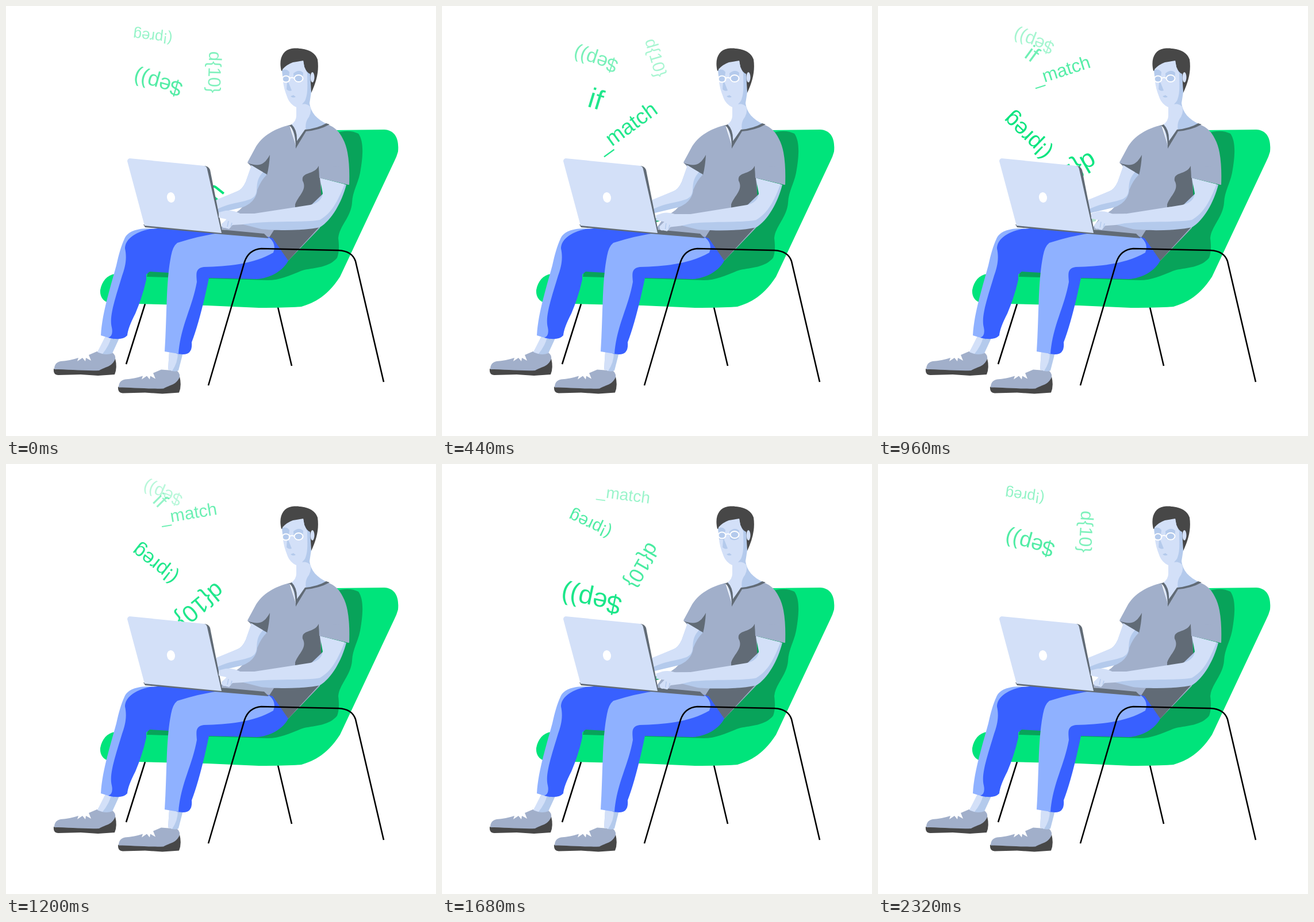
These frames come from a looping animation (748x748 px, 2.36 s). An HTML page:

```html
<!DOCTYPE html>
<html lang="en">
<head>
<meta charset="utf-8">
<title>Coding in a chair</title>
<style>
html, body { margin: 0; height: 100%; overflow: hidden; background: #fff; }
svg { display: block; width: 100vw; height: 100vh; }
text { font-family: "Liberation Sans", Arial, sans-serif; text-anchor: middle; fill: #00e47b; }
.green { fill: #00e47b; }
.shade { fill: #08a35a; }
.skin { fill: #d3e0f8; }
.skin2 { fill: #b4caec; }
.cloth { fill: #a1afca; }
.cloth2 { fill: #616b76; }
.pants { fill: #8fb1ff; }
.pants2 { fill: #3860ff; }
.dark { fill: #474747; }
.frame { fill: none; stroke: #000; stroke-width: 2.6; }
</style>
</head>
<body>
<svg viewBox="0 0 748 748">
  <path class="frame" d="M242 518L209 623M473 524L497 626"/>
  <path class="green" d="M570 216L658 215C677 216 684 231 682 253Q680 261 676 269L581 471C560 503 540 515 514 523Q490 525 440 525L350 521L185 517C169 516 163 506 164 494C167 478 176 468 190 466L300 458L500 400Z"/>
  <path class="shade" d="M570 222C590 216 602 217 613 222C623 236 621 262 616 290C612 310 603 322 602 342C600 368 580 382 578 404C580 420 579 430 576 438C562 455 538 455 519 459C500 465 480 477 455 477L350 474L245 471L247 462L300 455L480 400Z"/>

  <g id="words"></g>

  <!-- head and neck -->
  <path class="dark" d="M479 113C474 92 481 77 497 74C517 72 537 77 542 93C545 113 540 132 531 151L524 150L516 98Z"/>
  <path class="skin2" d="M517 95L519 106Q523 116 529 118L531 150L528 169C530 185 540 197 560 206L522 217L510 200L514 120Z"/>
  <path class="skin" d="M481 110Q488 102 499 98L517 95L519 106L524 117C524 136 526 152 520 165L515 171Q523 169 529 175Q532 184 527 193C520 202 521 211 522 218L505 247L495 207Q506 201 505 188V176C498 173 492 167 489 158Q483 143 482 131Z"/>
  <ellipse class="skin" cx="533" cy="124" rx="3.5" ry="9"/>
  <path class="skin2" d="M480 112Q488 108 493 115L491 132L497 147Q492 149 488 145L489 132L482 131ZM500 117Q510 109 517 116L516 130Q508 135 501 130ZM495 157L500 155L504 158Q499 161 495 157Z"/>
  <g id="glasses" fill="none" stroke="#fff" stroke-width="2">
    <ellipse cx="487" cy="127" rx="6.5" ry="5.5"/>
    <ellipse cx="509" cy="126" rx="7.5" ry="6"/>
    <path d="M493 126Q497 123 502 126"/>
  </g>

  <!-- shirt -->
  <path class="cloth" d="M493 207C469 213 445 225 433 248L420 272L440 296L426 335L406 355L384 371L372 388L460 404L491 443L546 386L548 299L597 311C598 285 597 250 586 231Q577 212 559 206L522 217L505 246Z"/>
  <path class="cloth2" d="M459 259C449 277 440 280 420 273L454 294Q458 278 459 259ZM544 278C537 294 513 288 516 304C525 320 507 331 503 345V352L550 348L546 299ZM547 382L491 443L457 404L466 390Z"/>
  <path class="cloth2" d="M489 209L497 206Q507 216 506 235L520 215Q542 213 557 204L563 206Q545 216 522 218L504 248Q504 217 493 208Z"/>

  <!-- far arm -->
  <path class="skin2" d="M427 278L454 293Q443 304 437 320C436 335 424 347 408 351L366 361V338L403 322Q411 319 417 306Z"/>
  <path class="skin" d="M427 277L447 289C431 306 440 321 433 330C425 342 395 339 366 354V337L403 322Q411 319 417 306Z"/>

  <!-- trousers, ankles, shoes -->
  <g id="shoe">
    <path class="dark" d="M83 631Q82 642 91 642L130 641L160 643L189 641Q194 629 190 613L150 626Z"/>
    <path class="cloth" d="M84 632Q84 620 95 618Q111 617 126 612L124 618L133 612L138 618L139 612L148 617L144 607L158 601L185 603Q191 607 190 614C184 628 174 627 162 634C140 635 105 632 84 632Z"/>
  </g>
  <use href="#shoe" x="112" y="31.5"/>
  <path class="skin2" d="M175 574L159 602Q173 609 185 604L197 578Z"/>
  <path class="skin" d="M173 574L159 602L168 605Q180 590 183 576Z"/>
  <path class="skin2" d="M284 601L282 632Q293 638 300 634L308 603Z"/>
  <path class="skin" d="M284 601L282 632L289 635Q299 620 299 603Z"/>
  <path class="pants" d="M245 387C222 388 211 394 206 405C200 418 196 433 192 451C180 495 167 535 165 573L188 580L230 460L300 390Z"/>
  <path class="pants2" d="M250 388C222 394 207 407 207 422C211 440 207 455 202 469C190 509 179 540 184 559Q187 574 178 577Q202 583 211 573Q212 560 225 535Q238 504 244 476V467L250 462L300 465L400 400L370 390L300 384Z"/>
  <path class="pants2" d="M450 400L464 404L491 443C482 461 458 474 436 475L353 473C346 508 334 557 323 585Q325 606 308 606L297 605L330 450Z"/>
  <path class="pants" d="M298 412Q335 400 376 394L458 403Q471 414 465 429C431 449 385 453 344 454C329 456 331 466 332 480C324 525 304 555 300 605L276 601C280 540 278 480 287 435Q290 418 298 412Z"/>

  <!-- laptop -->
  <path id="gap" class="shade" d="M370 370L380 367L379 374L373 376Z"/>
  <path class="cloth2" d="M239 380L375 389L449 396L457 404L374 397L242 385ZM344 278Q352 278 355 285L377 396L371 396Z"/>
  <path class="skin" d="M215 265L345 278Q349 279 350 284L375 395L241 382L211 270Q211 266 215 265Z"/>
  <ellipse cx="287" cy="333" rx="7" ry="9" fill="#fff" transform="rotate(-10 287 333)"/>

  <!-- near arm -->
  <g id="arm">
    <path class="skin2" d="M548 300L592 311C584 342 566 373 546 385C518 391 470 391 444 388L405 378L430 364L529 348L552 326Z"/>
    <path class="skin" d="M546 299L589 310C577 339 568 359 546 372C520 377 470 373 425 378L405 380L402 361L432 361L529 346Q549 342 551 326Z"/>
  </g>
  <g id="hand">
    <path class="skin" d="M430 361L411 363Q396 354 382 356L370 359V368L384 371L375 379Q375 387 381 386L388 388L394 381L412 380L430 377Z"/>
    <path d="M387 374L385 384M393 377L391 384" fill="none" stroke="#b4caec" stroke-width="1.5"/>
  </g>
  <path class="cloth" d="M544 278L545 299L596 311L594 280Z"/>
  <path class="frame" d="M352 660L415 445Q422 424 444 422L578 425Q602 426 608 444L657 654"/>
</svg>
<script>
const LOOP = 2360;
const byId = id => document.getElementById(id);
const clamp01 = v => Math.max(0, Math.min(1, v));

// Pairs are [value, rate per ms] at time ref; y and size are [rest, extra], the extra decaying.
const words = [
  { label: 'if', start: -120, end: 1440, ref: 440, decay: .00152, x: [267, 0], y: [19, 146], turn: [17, .037], size: [30, 19], alpha: [.87, -.0006] },
  { label: '(!preg', start: 600, end: 2480, ref: 1200, decay: .00115, x: [260, -.004], y: [9, 164], turn: [218, -.027], size: [23.2, 11.5], alpha: [.87, -.0004] },
  { label: '_match', start: -160, end: 2040, ref: 440, decay: .00138, x: [322, -.005], y: [20, 193], turn: [-36, .035], size: [26.3, 11], alpha: [.86, -.00038] },
  { label: 'd{10}', start: 560, end: 3300, ref: 1200, decay: .00082, x: [336, .0215], y: [34, 210], turn: [140, -.0415], size: [25, 16], alpha: [.87, -.00033] },
  { label: '$ep))', start: 1380, end: 3840, ref: 1680, decay: .00086, x: [260, .0068], y: [4, 230], turn: [192, .0055], size: [26.5, 19], alpha: [.89, -.00033] }
];

function addText(label) {
  const node = document.createElementNS('http://www.w3.org/2000/svg', 'text');
  node.textContent = label;
  byId('words').append(node);
  return node;
}
// Long-lived words overlap their own next run, so each has two copies.
for (const word of words) word.nodes = [addText(word.label), addText(word.label)];

function drawWord(word, node, age) {
  const dt = word.start + age - word.ref;
  const fade = Math.exp(-word.decay * dt);
  const linear = ([value, rate]) => value + rate * dt;
  const decaying = ([rest, extra]) => rest + extra * fade;
  const size = decaying(word.size) * clamp01(age / 150);
  node.style.display = age < word.end - word.start ? '' : 'none';
  node.style.fontSize = size + 'px';
  node.setAttribute('opacity', clamp01(linear(word.alpha)));
  node.setAttribute('y', size * .28);
  node.setAttribute('transform', `translate(${linear(word.x)} ${decaying(word.y)}) rotate(${linear(word.turn)})`);
}

function draw(now) {
  const t = now % LOOP;
  for (const word of words) {
    const age = (t - word.start + LOOP) % LOOP;
    word.nodes.forEach((node, run) => drawWord(word, node, age + run * LOOP));
  }
  const press = Math.sin(Math.PI * t / (LOOP / 2)) ** 2;
  byId('arm').setAttribute('transform', `rotate(${-.4 * press} 580 310)`);
  byId('hand').setAttribute('transform', `translate(${3 * press} ${2 * press}) rotate(${-4 * press} 425 370)`);
  byId('gap').setAttribute('opacity', press);
  const lift = clamp01((t - 1400) / 160) - clamp01((t - 2200) / 130);
  byId('glasses').setAttribute('transform', `translate(0 ${-3 * lift})`);
}

const begin = performance.now();
function tick() {
  draw(performance.now() - begin);
  requestAnimationFrame(tick);
}
tick();
</script>
</body>
</html>
```
